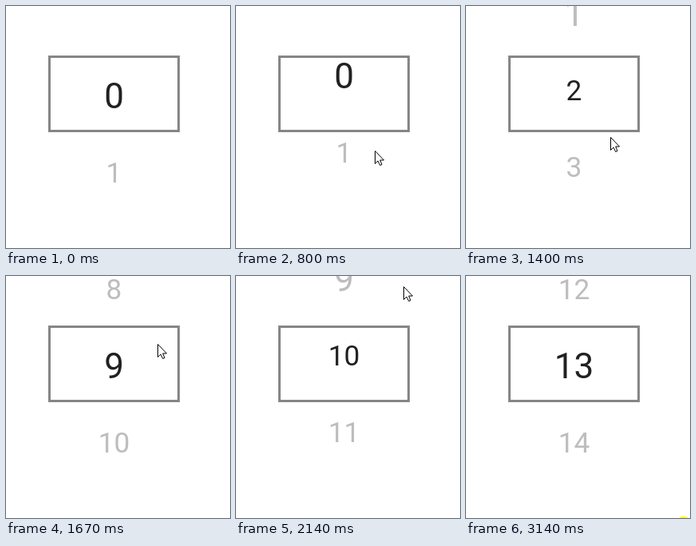
Write an HTML page with a canvas that moves like this. It is 281 px wide and 303 px high and loops after 3280 ms.

```html
<!DOCTYPE html>
<html lang="en">
<head>
<meta charset="utf-8">
<title>Number picker</title>
<style>
  html, body { margin: 0; width: 100%; height: 100%; overflow: hidden; background: #fff; }
  canvas { display: block; }
</style>
</head>
<body>
<canvas id="stage" width="281" height="303"></canvas>
<script>
const ctx = document.getElementById('stage').getContext('2d');
const LOOP = 3280, STEP = 66.7;
const CENTER_X = 135.5, CENTER_Y = 112.7, ROW = 96;
const SMALL = 35.2, LARGE = 44;

const flings = [
  { at: 10, span: 5.4, rows: 1 },
  { at: 20, span: 3.6, rows: 8 },
  { at: 30.1, span: 5, rows: 4 }
];

// Turning points of the hand: [step, x, y].
const turns = [
  [2, 207, 230], [5, 163, 173], [8, 169, 202], [9, 169, 202],
  [10.5, 168, 214], [13.5, 180, 147], [17, 177, 206], [18, 177, 206],
  [20, 176, 216], [23, 195, 16], [28, 181, 212], [32, 210, 13],
  [35, 222, 175], [38, 268, 275]
];
const SHOWN = 2, GONE = 39, GLOW = 47;

const clamp = u => Math.min(1, Math.max(0, u));
const smooth = u => u * u * (3 - 2 * u);
const smoother = u => u * u * u * (u * (6 * u - 15) + 10);
const mix = (a, b, k) => a + (b - a) * k;

function position(n) {
  return flings.reduce((sum, f) => sum + f.rows * smoother(clamp((n - f.at) / f.span)), 0);
}

const selected = n => Math.round(position(n));

// Growth starts one step after a number becomes selected.
function emphasis(value, n) {
  if (selected(n - 1) !== value) return 0;
  return selected(n - 2) === value ? 1 : 0.8;
}

function drawNumbers(n) {
  const pos = position(n), current = selected(n);
  ctx.textAlign = 'center';
  for (let v = Math.max(0, current - 1); v <= current + 1; v++) {
    const size = mix(SMALL, LARGE, emphasis(v, n));
    ctx.font = `${size}px Roboto, sans-serif`;
    ctx.fillStyle = v === current ? '#212121' : '#bdbdbd';
    ctx.fillText(v, CENTER_X, CENTER_Y + (v - pos) * ROW + size * 0.3555);
  }
}

function drawFrame() {
  ctx.lineWidth = 3;
  ctx.strokeStyle = '#868686';
  ctx.strokeRect(54.5, 63.5, 162, 93);
}

function drawPointer(n) {
  const i = Math.max(1, turns.findIndex(turn => n <= turn[0]));
  const [t0, x0, y0] = turns[i - 1], [t1, x1, y1] = turns[i];
  const k = smooth((n - t0) / (t1 - t0));
  ctx.save();
  ctx.translate(Math.round(mix(x0, x1, k)), Math.round(mix(y0, y1, k)));
  const arrow = new Path2D('M.5 .5V16.5L4 13L6.7 18.5L9 17.5L6.7 12H11.5Z');
  ctx.fillStyle = '#fff';
  ctx.fill(arrow);
  ctx.lineWidth = 1;
  ctx.strokeStyle = '#000';
  ctx.stroke(arrow);
  ctx.restore();
}

function drawGlow() {
  ctx.fillStyle = '#ff0';
  ctx.beginPath();
  ctx.arc(273, 311, 10, 0, Math.PI * 2);
  ctx.fill();
}

function draw(t) {
  const n = Math.floor((t + 8) / STEP);
  ctx.fillStyle = '#fff';
  ctx.fillRect(0, 0, 281, 303);
  drawNumbers(n);
  drawFrame();
  if (n >= SHOWN && n < GONE) drawPointer(n);
  if (n >= GLOW) drawGlow();
}

const start = performance.now();
function tick() {
  draw((performance.now() - start) % LOOP);
  requestAnimationFrame(tick);
}
tick();
</script>
</body>
</html>
```
